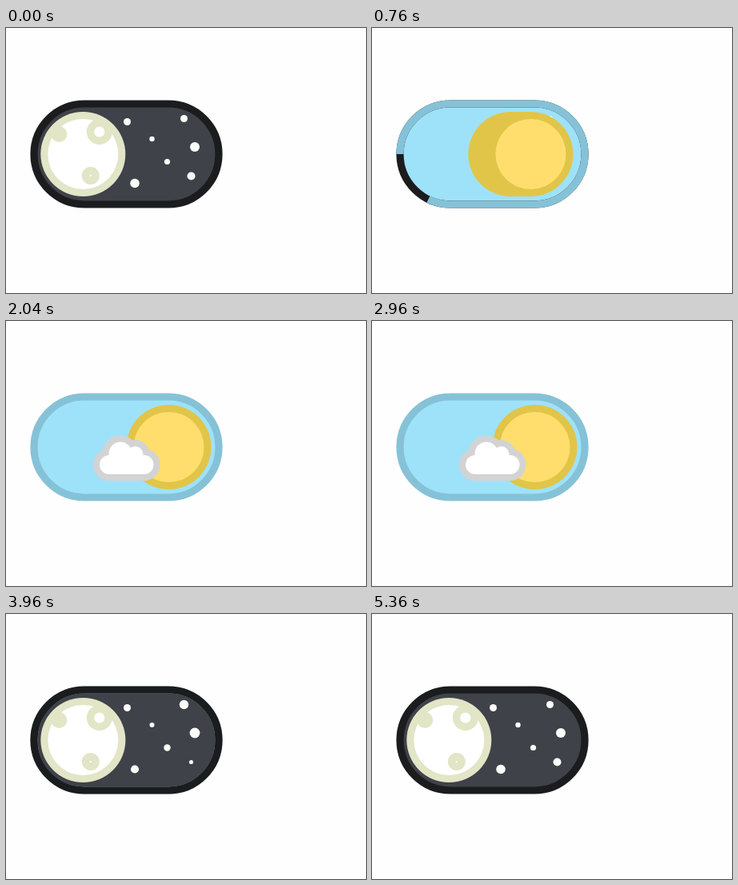
An HTML page for the animation above (5.44 s loop, 450 by 332 pixels).

```html
<!DOCTYPE html>
<html lang="en">
<head>
<meta charset="utf-8">
<title>Day and night switch</title>
<style>
  html, body { margin: 0; width: 100%; height: 100%; overflow: hidden; background: #fefefe; }
  svg { display: block; width: 100vw; height: 100vh; }
  .line { fill: none; stroke-width: 9.2; }
  .sun { fill: #e1c548; }
  .sun circle { fill: #ffde6e; }
  .moon { fill: #e2e5c6; }
  .moon .hole, .moon .face { fill: #fff; }
  #stars { fill: #fefef9; }
  .rim { fill: #d3d3d3; stroke: #d3d3d3; stroke-width: 16; stroke-linejoin: round; }
  .puff { fill: #fff; }
</style>
</head>
<body>
<svg viewBox="0 0 450 332">
  <defs>
    <path id="pill" pathLength="1" d="M35 158A63 63 0 0 1 98 95H203A63 63 0 0 1 203 221H98A63 63 0 0 1 35 158Z"/>
    <g id="puffs">
      <circle cx="129" cy="180" r="12"/>
      <circle cx="143" cy="166" r="14.5"/>
      <circle cx="161.5" cy="167" r="10"/>
      <circle cx="172.5" cy="180" r="12"/>
      <rect x="129" y="170" width="43.5" height="22"/>
    </g>
  </defs>
  <use id="sky" href="#pill"/>
  <g id="stars"></g>
  <use id="base" class="line" href="#pill"/>
  <use id="sweep" class="line" href="#pill"/>
  <g id="sun" class="sun">
    <rect class="body" y="105" height="106" rx="53"/>
    <circle class="face" cy="158" r="44"/>
  </g>
  <g id="cloud">
    <use class="rim" href="#puffs"/>
    <use class="puff" href="#puffs"/>
  </g>
  <g id="moon" class="moon">
    <rect class="body" y="105" height="106" rx="53"/>
    <circle class="face" cy="158" r="44"/>
    <g id="craters">
      <circle cx="-30" cy="-25" r="10"/><circle class="hole" cx="-30" cy="-25"/>
      <circle cx="20.5" cy="-28" r="16"/><circle class="hole" cx="20.5" cy="-28"/>
      <circle cx="9.5" cy="27" r="11"/><circle class="hole" cx="9.5" cy="27"/>
    </g>
  </g>
</svg>
<script>
const LOOP = 5440, TO_DAY = 380, TO_NIGHT = 3420;
const NIGHT_X = 96.3, DAY_X = 203.5, R = 53;
const SKY = [[63, 66, 72], [158, 226, 250]];
const EDGE = ['#1b1c1e', '#86c2d7'];

// x, y, radius, delay of appearance
const STARS = [
  [151.5, 117.5, 4.5, 278], [182.5, 139, 3.2, 300], [161, 194.5, 5.8, 330],
  [236, 149, 6, 393], [201.5, 167.5, 3.6, 407], [222.5, 113.5, 4.5, 421],
  [231.5, 185.5, 5, 512]
];

const $ = id => document.getElementById(id);
const part = (t, from, span) => Math.min(1, Math.max(0, (t - from) / span));
const quad = p => p < .5 ? 2 * p * p : 1 - 2 * (1 - p) ** 2;
const cubic = p => p < .5 ? 4 * p ** 3 : 1 - 4 * (1 - p) ** 3;
const elastic = p => p <= 0 ? 0 : p >= 1 ? 1 :
  1 + 2 ** (-10 * p) * Math.sin((p - .075) * 2 * Math.PI / .3);
const shrink = p => Math.max(0, 1 - p * p * (2.7 * p - 1.7));

const dots = STARS.map(([x, y]) => {
  const dot = document.createElementNS('http://www.w3.org/2000/svg', 'circle');
  dot.setAttribute('cx', x);
  dot.setAttribute('cy', y);
  return $('stars').appendChild(dot);
});
const holes = document.querySelectorAll('.hole');

function set(el, attrs) {
  for (const key in attrs) el.setAttribute(key, attrs[key]);
}

function placeKnob(id, left, right, face) {
  const knob = $(id);
  set(knob.querySelector('.body'), { x: left, width: right - left });
  set(knob.querySelector('.face'), { cx: face });
}

function draw(now) {
  const t = now % LOOP;
  const day = t >= TO_DAY && t < TO_NIGHT;
  // the loop opens with the night already settled
  const s = t < TO_DAY ? LOOP : t - (day ? TO_DAY : TO_NIGHT);

  // sky and border
  const fade = part(s, 0, day ? 165 : 234);
  const light = day ? fade : 1 - fade;
  const rgb = SKY[0].map((c, i) => Math.round(c + (SKY[1][i] - c) * light));
  set($('sky'), { fill: `rgb(${rgb})` });
  const drawn = cubic(part(s, 0, 550));
  const edge = EDGE[+day];
  set($('base'), { stroke: drawn < 1 ? EDGE[+!day] : edge });
  set($('sweep'), {
    stroke: edge,
    'stroke-dasharray': `${drawn} 2`,
    visibility: drawn > 0 && drawn < 1 ? 'visible' : 'hidden',
    transform: day ? '' : 'rotate(180 150.5 158)'
  });

  // knob: one side leads, the other catches up
  const lead = quad(part(s, 0, 450)), trail = quad(part(s, 100, 450));
  const from = day ? NIGHT_X : DAY_X, way = (DAY_X - NIGHT_X) * (day ? 1 : -1);
  const head = from + way * lead, tail = from + way * trail;
  const left = Math.min(head, tail) - R, right = Math.max(head, tail) + R;
  placeKnob('sun', left, right, head);
  placeKnob('moon', left, right, head);
  const swap = part(s, 0, 140);
  const moon = day ? 1 - swap : swap;
  set($('moon'), { opacity: moon });
  set($('sun'), { opacity: moon < 1 ? 1 : 0 });

  const turn = day ? lead : 1 - lead;
  set($('craters'), { transform: `translate(${head} 158) rotate(${58 * turn})` });
  [4 * turn, 6.6, 1.2 + turn].forEach((r, i) => set(holes[i], { r }));

  // stars and cloud
  const gone = shrink(part(s, 140, 300));
  STARS.forEach(([, , r, wait], i) => {
    set(dots[i], { r: r * (day ? gone : elastic(part(s, wait, 700))) });
  });
  const size = day ? elastic(part(s, 420, 800)) : gone;
  set($('cloud'), {
    transform: `translate(150.8 172) scale(${size}) translate(-150.8 -172)`,
    visibility: size > 0 ? 'visible' : 'hidden'
  });
}

const start = performance.now();
function tick() {
  draw(performance.now() - start);
  requestAnimationFrame(tick);
}
tick();
</script>
</body>
</html>
```
